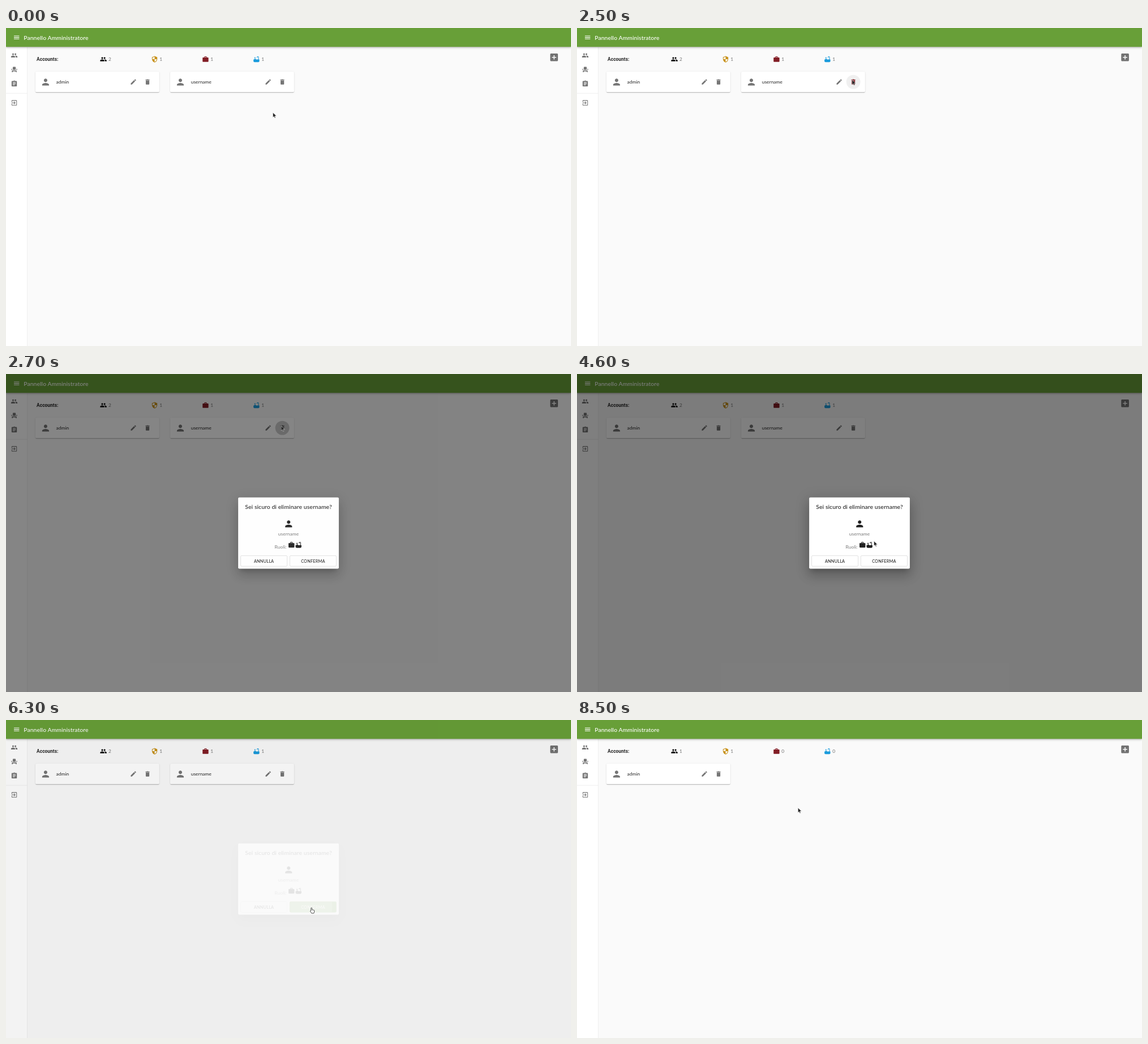
An HTML page for the animation above (9000 ms loop, 998 by 561 pixels).

```html
<!DOCTYPE html>
<html lang="it">
<head>
<meta charset="utf-8">
<title>Pannello Amministratore</title>
<style>
html, body { margin: 0; width: 100%; height: 100%; overflow: hidden; background: #fafafa; }
#app { position: absolute; width: 1920px; height: 1080px; transform: scale(.51979); transform-origin: 0 0;
  font: 16px/24px Lato, sans-serif; letter-spacing: .15px; color: rgba(0,0,0,.87); }
#app div, #app svg { position: absolute; box-sizing: border-box; }
.text { white-space: pre; }
.grey { color: rgba(0,0,0,.54); }
.h6 { font-size: 20px; font-weight: 500; }
.fill { left: 0; top: 0; width: 1920px; height: 1080px; }
#bar { left: 0; top: 0; width: 1920px; height: 64px; background: #689f38; color: #fff;
  box-shadow: 0 2px 4px -1px rgba(0,0,0,.2), 0 4px 5px rgba(0,0,0,.14), 0 1px 10px rgba(0,0,0,.12); }
#drawer { left: 0; top: 64px; width: 73px; height: 1016px; background: #fff; border-right: 1px solid #e0e0e0; }
.card { top: 148px; width: 421px; height: 70px; background: #fff; border-radius: 4px;
  box-shadow: 0 3px 1px -2px rgba(0,0,0,.2), 0 2px 2px rgba(0,0,0,.14), 0 1px 5px rgba(0,0,0,.12); }
#press { left: 357px; top: 11px; width: 48px; height: 48px; border-radius: 50%; background: #000; }
#modal { background: rgba(0,0,0,.5); }
#paper { left: 789px; top: 419px; width: 342px; height: 242px; background: #fff; border-radius: 4px;
  box-shadow: 0 11px 15px -7px rgba(0,0,0,.2), 0 24px 38px 3px rgba(0,0,0,.14), 0 9px 46px 8px rgba(0,0,0,.12); }
.mid { left: 0; width: 100%; text-align: center; }
.button { top: 197px; width: 159px; height: 37px; border: 1px solid rgba(0,0,0,.23); border-radius: 4px;
  overflow: hidden; text-align: center; font-size: 14px; line-height: 35px; font-weight: 500; letter-spacing: .4px; }
#ripple { left: 72px; top: 17px; border-radius: 50%; background: rgba(255,255,255,.22); }
</style>
</head>
<body>
<div id="app"></div>
<script>
const PATHS = {
  menu: 'M3 18h18v-2H3v2zm0-5h18v-2H3v2zm0-7v2h18V6H3z',
  people: 'M16 11c1.66 0 2.99-1.34 2.99-3S17.66 5 16 5s-3 1.34-3 3 1.34 3 3 3zm-8 0c1.66 0 2.99-1.34 2.99-3S9.66 5 8 5 5 6.34 5 8s1.34 3 3 3zm0 2c-2.33 0-7 1.17-7 3.5V19h14v-2.5C15 14.17 10.33 13 8 13zm8 0-.97.05C16.19 13.89 17 15.02 17 16.5V19h6v-2.5c0-2.33-4.67-3.5-7-3.5z',
  seat: 'M4 18v3h3v-3h10v3h3v-6H4zm15-8h3v3h-3zM2 10h3v3H2zm15 3H7V5c0-1.1.9-2 2-2h6c1.1 0 2 .9 2 2z',
  list: 'M19 3h-4.18C14.4 1.84 13.3 1 12 1s-2.4.84-2.82 2H5c-1.1 0-2 .9-2 2v14c0 1.1.9 2 2 2h14c1.1 0 2-.9 2-2V5c0-1.1-.9-2-2-2zm-7 0c.55 0 1 .45 1 1s-.45 1-1 1-1-.45-1-1 .45-1 1-1zm2 14H7v-2h7zm3-4H7v-2h10zm0-4H7V7h10z',
  exit: 'M10.09 15.59 11.5 17l5-5-5-5-1.41 1.41L12.67 11H3v2h9.67zM19 3H5c-1.11 0-2 .9-2 2v4h2V5h14v14H5v-4H3v4c0 1.1.89 2 2 2h14c1.1 0 2-.9 2-2V5c0-1.1-.9-2-2-2z',
  shield: 'M12 1 3 5v6c0 5.55 3.84 10.74 9 12 5.16-1.26 9-6.45 9-12V5zm0 10.99h7c-.53 4.12-3.28 7.79-7 8.94V12H5V6.3l7-3.11z',
  work: 'M20 6h-4V4c0-1.11-.89-2-2-2h-4c-1.11 0-2 .89-2 2v2H4c-1.11 0-2 .89-2 2v11c0 1.11.89 2 2 2h16c1.11 0 2-.89 2-2V8c0-1.11-.89-2-2-2zm-6 0h-4V4h4z',
  bath: 'M5 7a2 2 0 1 0 4 0a2 2 0 1 0-4 0M20 13V4.83C20 3.27 18.73 2 17.17 2c-.75 0-1.47.3-2 .83l-1.25 1.25c-.16-.05-.33-.08-.51-.08-.4 0-.77.12-1.08.32l2.76 2.76c.2-.31.32-.68.32-1.08 0-.18-.03-.34-.07-.51l1.25-1.25c.15-.15.36-.24.58-.24.46 0 .83.37.83.83V13h-6.85c-.3-.21-.57-.45-.82-.72l-1.4-1.55c-.19-.21-.43-.38-.69-.5C7.93 10.08 7.59 10 7.24 10 6 10.01 5 11.01 5 12.25V13H2v6c0 1.1.9 2 2 2 0 .55.45 1 1 1h14c.55 0 1-.45 1-1 1.1 0 2-.9 2-2v-6z',
  add: 'M19 3H5c-1.11 0-2 .9-2 2v14c0 1.1.89 2 2 2h14c1.1 0 2-.9 2-2V5c0-1.1-.9-2-2-2zm-2 10h-4v4h-2v-4H7v-2h4V7h2v4h4z',
  person: 'M12 12c2.21 0 4-1.79 4-4s-1.79-4-4-4-4 1.79-4 4 1.79 4 4 4zm0 2c-2.67 0-8 1.34-8 4v2h16v-2c0-2.66-5.33-4-8-4z',
  edit: 'M3 17.25V21h3.75L17.81 9.94l-3.75-3.75zM20.71 7.04c.39-.39.39-1.02 0-1.41l-2.34-2.34c-.39-.39-1.02-.39-1.41 0l-1.83 1.83 3.75 3.75z',
  trash: 'M6 19c0 1.1.9 2 2 2h8c1.1 0 2-.9 2-2V7H6zM19 4h-3.5l-1-1h-5l-1 1H5v2h14z'
};
const GREY = 'rgba(0,0,0,.54)', DARK = 'rgba(0,0,0,.87)', RED = '#821d25';

// Icons are placed by centre, text by left edge and middle line.
const icon = (name, x, y, color = GREY, size = 24) =>
  `<svg class="${name}" viewBox="0 0 24 24" width="${size}" height="${size}" style="left:${x - size / 2}px;top:${y - size / 2}px" fill="${color}"><path d="${PATHS[name]}"/></svg>`;
const text = (str, x, y, cls = '', style = '') =>
  `<div class="text ${cls}" style="left:${x}px;top:${y - 12}px;${style}">${str}</div>`;
const middle = (str, y, cls = '') => `<div class="text mid ${cls}" style="top:${y - 12}px">${str}</div>`;
const card = (id, name, x, extra = '') => `<div class="card" id="${id}" style="left:${x}px">${extra}
  ${icon('person', 34, 35, GREY, 35)}${text(name, 70.5, 35)}${icon('edit', 333, 35)}${icon('trash', 381, 35)}</div>`;
const stat = (name, x, color) => icon(name, x, 106, color) + text('', x + 17, 106, 'grey count');

const $ = id => document.getElementById(id);
$('app').innerHTML = `
  ${text('Accounts:', 104, 106, '', 'font-family:Roboto,sans-serif;font-weight:700')}
  ${stat('people', 331, '#000')}${stat('shield', 505, '#c8921a')}${stat('work', 678, RED)}${stat('bath', 851, '#1a9bdc')}
  ${icon('add', 1862, 99.5, GREY, 35)}
  ${card('admin', 'admin', 100)}${card('user', 'username', 558, '<div id="press"></div>')}
  <div id="drawer">${icon('people', 28, 29)}${icon('seat', 28, 77)}${icon('list', 28, 125)}
    <div style="left:0;top:157px;width:72px;height:1px;background:#e0e0e0"></div>${icon('exit', 28, 190)}</div>
  <div id="bar">${icon('menu', 36, 32, '#fff')}${text('Pannello Amministratore', 60, 32, 'h6')}</div>
  <div id="modal" class="fill"><div id="paper">
    ${middle('Sei sicuro di eliminare username?', 30, 'h6')}
    ${icon('person', 171, 89, DARK, 35)}${middle('username', 124, 'grey')}
    ${text('Ruoli:', 124, 167, 'grey')}${icon('work', 181, 161, DARK)}${icon('bath', 205, 161, DARK)}
    <div class="button" style="left:8px">ANNULLA</div>
    <div class="button" id="confirm" style="left:175px"><div id="ripple"></div>CONFERMA</div>
  </div></div>
  <svg id="cursor" width="24" height="28" style="overflow:visible">
    <path id="arrow" fill="#222" stroke="#fff" d="M0 0V16.5l3.8-3.5 2.6 5.6 2.7-1.2-2.5-5.5H12z"/>
    <path id="hand" fill="#fff" stroke="#222" stroke-width="1.5" transform="translate(-3 -1)" d="M5 1.2c1.2 0 1.8.8 1.8 1.9v5l6 1.1c1.6.3 2.4 1.2 2.2 2.8l-.8 4.5-1 3.5H5.6L1 13.3c-.7-1 .8-2.4 2-1.4l.3.3V3.1C3.3 2 3.9 1.2 5 1.2z"/>
  </svg>`;

// Cursor moves: start time, end time, destination.
const MOVES = [
  [1400, 2000, 935, 176],
  [3100, 3500, 959, 437],
  [4000, 5000, 1036, 637],
  [6300, 6700, 893, 375],
  [7300, 8300, 751, 298]
];
const smooth = (a, b, t) => {
  const p = Math.min(1, Math.max(0, (t - a) / (b - a)));
  return p * p * (3 - 2 * p);
};
const show = (id, on) => $(id).style.display = on ? '' : 'none';
const counts = document.querySelectorAll('.count');
const trash = document.querySelector('#user .trash');

function draw(t) {
  let x = 907, y = 287;
  for (const [a, b, toX, toY] of MOVES) {
    const p = smooth(a, b, t);
    x += (toX - x) * p;
    y += (toY - y) * p;
  }
  $('cursor').style.left = x + 'px';
  $('cursor').style.top = y + 'px';
  const hover = y > 616 && t < 6400;
  show('hand', hover);
  show('arrow', !hover);

  trash.style.fill = y < 195 && t < 2600 ? RED : GREY;
  $('press').style.opacity = t >= 2500 && t < 2800 ? .06 + (t - 2500) * .0007 : 0;
  $('modal').style.opacity = smooth(2500, 2730, t) - smooth(6170, 6330, t);
  $('confirm').style.cssText = 'left:175px;' + (hover ? 'background:#689f38;border-color:#689f38;color:#fff' : '');
  const r = t < 6400 ? Math.max(0, (t - 5900) * .18) : 0;
  $('ripple').style.cssText = `width:${2 * r}px;height:${2 * r}px;margin:${-r}px`;

  const removed = t >= 6500;
  show('user', !removed);
  counts.forEach((el, i) => el.textContent = (removed ? '1100' : '2111')[i]);
}

const start = performance.now();
function tick() {
  // The screen refreshes in steps of 100 ms.
  draw(Math.floor((performance.now() - start) % 9000 / 100) * 100);
  requestAnimationFrame(tick);
}
tick();
</script>
</body>
</html>
```
